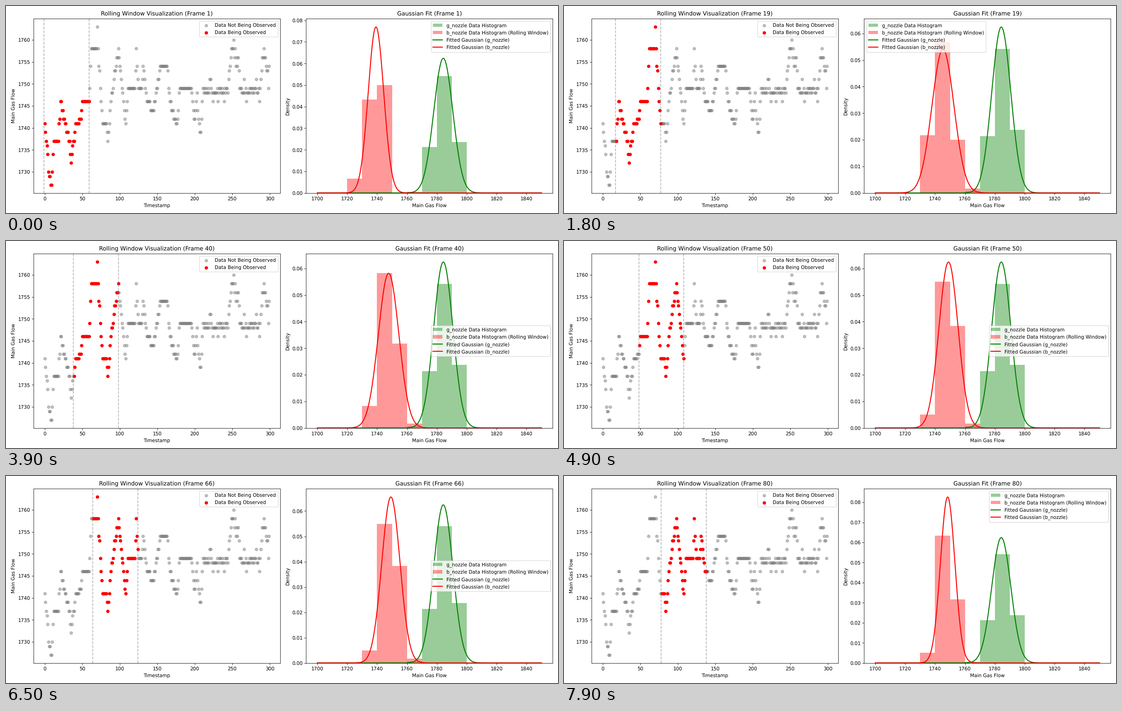
Write a matplotlib script that moves like this. It is 1222 px wide and 458 px high and loops after 8 s.

```python
import matplotlib.pyplot as plt
import numpy as np
from matplotlib.animation import FuncAnimation

W, H = 1222, 458
DPI = W / 16
FRAMES, INTERVAL = 80, 100
WINDOW = 60

plt.rcParams["text.hinting"] = "none"
rng = np.random.default_rng(4)

# Turning points (timestamp, flow above 1700) of the slow drift.
turns = [
    (0, 41), (6, 29), (9, 27), (12, 37), (18, 37), (21, 46), (27, 41), (33, 37),
    (35, 32), (41, 41), (48, 42), (50, 46), (59, 46), (62, 58), (69, 58), (70, 63),
    (71, 58), (77, 41), (82, 41), (84, 37), (88, 46), (98, 58), (108, 41), (111, 49),
    (120, 49), (122, 57), (125, 49), (129, 49), (131, 54), (136, 46), (145, 44),
    (154, 54), (163, 54), (167, 46), (176, 41), (180, 49), (195, 49), (199, 42),
    (203, 47), (207, 39), (211, 48), (244, 48), (249, 58), (258, 54), (261, 48),
    (286, 48), (290, 56), (299, 52),
]
time = np.arange(300)
drift = np.interp(time, *zip(*turns))
drift += np.where(time > 207, rng.normal(0, 1.2, len(time)), 0)

# The sensor only reports levels 12/7 apart, rounded to whole units.
STEP = 12 / 7
flow = np.round(1727 + STEP * np.round((drift - 27) / STEP))
points = np.column_stack([time, flow])

edges = np.arange(1700, 1851, 10)
grid = np.linspace(1700, 1850, 1000)


def gauss(mean, std):
    return np.exp(-((grid - mean) / std) ** 2 / 2) / (std * np.sqrt(2 * np.pi))


good_bars = np.zeros(len(edges) - 1)
good_bars[6:11] = 0.0006, 0.0214, 0.0541, 0.0237, 0.0002
good_curve = gauss(1784.3, 6.39)

fig = plt.figure(figsize=(W / DPI, H / DPI), dpi=DPI)


def add_axes(left, xlabel, ylabel):
    ax = fig.add_axes([left / W, 44.3 / H, 546 / W, 385.6 / H])
    ax.set_xlabel(xlabel)
    ax.set_ylabel(ylabel)
    return ax


ax = add_axes(61, "Timestamp", "Main Gas Flow")
ax.set_xlim(-14.95, 313.95)
ax.set_ylim(1725.2, 1764.8)
idle = ax.scatter([], [], color="gray", alpha=0.5, label="Data Not Being Observed")
seen = ax.scatter([], [], color="red", label="Data Being Observed")
bounds = [ax.axvline(0, color="gray", ls="--", alpha=0.6) for _ in range(2)]
ax.legend(loc="upper right")

fit = add_axes(664.3, "Main Gas Flow", "Density")
fit.set_xlim(1692.5, 1857.5)


def add_bars(heights, color, label):
    return fit.bar(edges[:-1], heights, width=10, align="edge",
                   color=color, alpha=0.4, label=label)


def add_curve(density, color, label):
    return fit.plot(grid, density, color=color, lw=2, label=label)[0]


good_hist = add_bars(good_bars, "green", "g_nozzle Data Histogram")
bars = add_bars(good_bars * 0, "red", "b_nozzle Data Histogram (Rolling Window)")
good_line = add_curve(good_curve, "green", "Fitted Gaussian (g_nozzle)")
curve = add_curve(grid * 0, "red", "Fitted Gaussian (b_nozzle)")
legend = fit.legend(handles=[good_hist, bars, good_line, curve], loc="upper right")


def free_corner(left_peak, right_peak):
    """Legend place that hides least of the peaks, given as shares of the height."""
    if right_peak < 0.845:
        return "upper right"
    return "upper left" if left_peak < 0.845 else "center right"


def update(i):
    inside = (time >= i) & (time < i + WINDOW)
    idle.set_offsets(points[~inside])
    seen.set_offsets(points[inside])
    for line, x in zip(bounds, (i - 1, i + WINDOW - 1)):
        line.set_xdata([x, x])

    sample = flow[inside]
    heights = np.histogram(sample, edges, density=True)[0]
    for bar, height in zip(bars, heights):
        bar.set_height(height)
    density = gauss(sample.mean(), sample.std())
    curve.set_ydata(density)
    top = 1.05 * max(heights.max(), density.max(), good_curve.max())
    fit.set_ylim(0, top)
    legend.set_loc(free_corner(density.max() / top, good_curve.max() / top))

    ax.set_title(f"Rolling Window Visualization (Frame {i + 1})")
    fit.set_title(f"Gaussian Fit (Frame {i + 1})")
    return []


anim = FuncAnimation(fig, update, frames=FRAMES, interval=INTERVAL, repeat=True)
plt.show()
```
